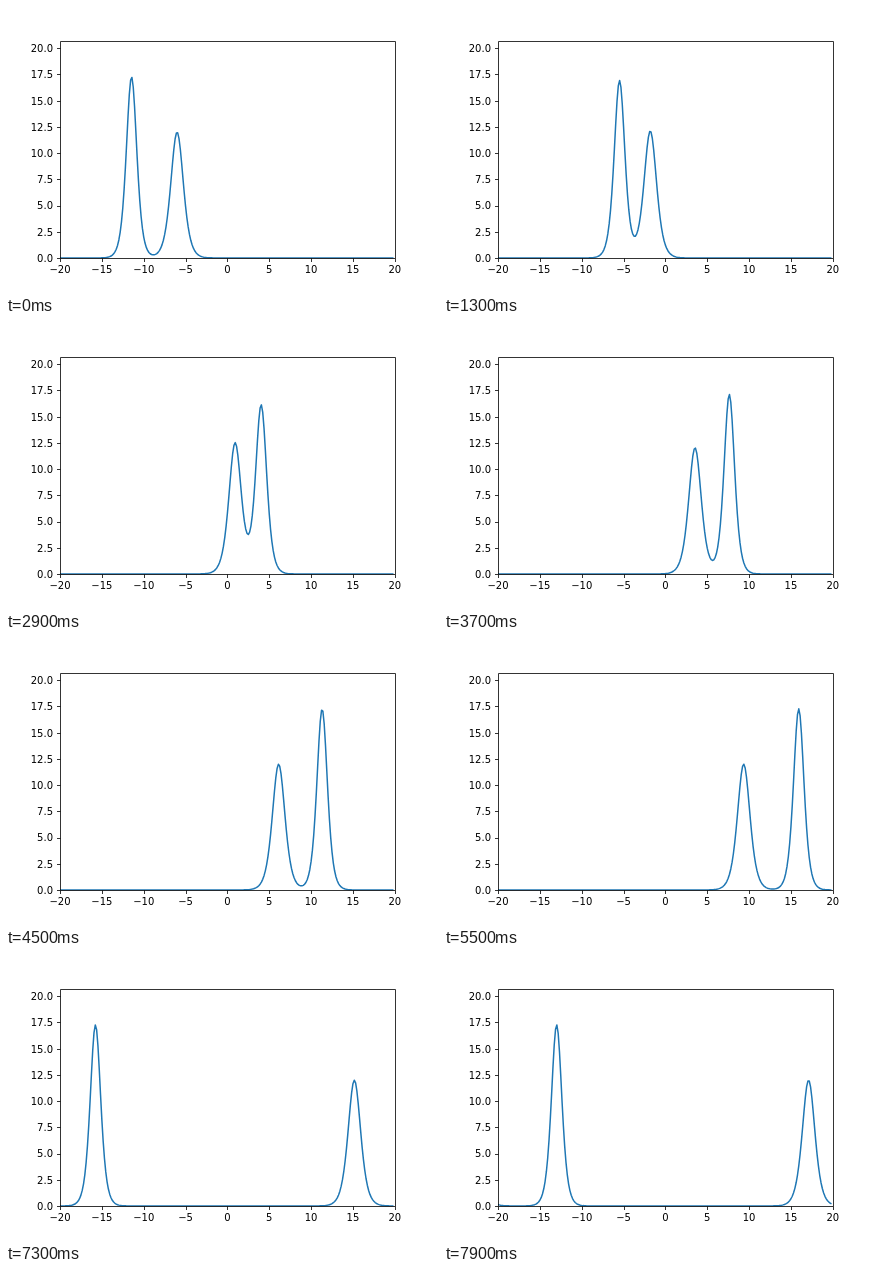
Write an HTML page that moves like this. It is 432 by 288 pixels and loops after 8000 ms.

```html
<!DOCTYPE html>
<html lang="en">
<head>
<meta charset="utf-8">
<title>Two solitons</title>
<style>
  html, body { margin: 0; width: 100%; height: 100%; overflow: hidden; background: #fff; }
  svg { display: block; width: 432px; height: 288px; }
  text { font: 10px "DejaVu Sans", Verdana, sans-serif; fill: #000; }
  .axis { fill: none; stroke: #000; stroke-width: 0.8; }
  #curve { fill: none; stroke: #1f77b4; stroke-width: 1.5; stroke-linejoin: round; }
</style>
</head>
<body>
<svg viewBox="0 0 432 288">
  <clipPath id="plot"><rect x="54" y="35" width="335" height="217.5"/></clipPath>
  <path id="curve" clip-path="url(#plot)"/>
  <path class="axis" d="M54.5 35.5H389.5V252.5H54.5Z"/>
  <g id="ticks"></g>
</svg>
<script>
const LOOP = 8000, STEP = 100;
const SPAN = 40, POINTS = 256;
const LEFT = 54, BOTTOM = 252, WIDTH = 334.8, HEIGHT = 217.44;

// Wave numbers, start positions and speeds; each height is 3k².
const tall = { k: 2.4, start: -11.45, speed: 4.615 };
const small = { k: 2, start: -8.41, speed: 3.23 };
const Y_MAX = 3 * tall.k ** 2 * 1.2;
const coupling = ((tall.k - small.k) / (tall.k + small.k)) ** 2;

const px = x => LEFT + (x + SPAN / 2) / SPAN * WIDTH;
const py = y => BOTTOM - y / Y_MAX * HEIGHT;
const snap = v => Math.floor(v + 0.5) + 0.5;

// Two-soliton solution of the KdV equation: u = 12 (ln F)''.
function height(x, t) {
  const phase = s => s.k * (x - s.start - s.speed * t);
  const a = phase(tall), b = phase(small);
  const both = a + b + Math.log(coupling);
  const top = Math.max(0, a, b, both);
  const terms = [[0, 0], [a, tall.k], [b, small.k], [both, tall.k + small.k]];
  let f = 0, f1 = 0, f2 = 0;
  for (const [p, k] of terms) {
    const e = Math.exp(p - top);
    f += e;
    f1 += k * e;
    f2 += k * k * e;
  }
  return 12 * (f2 / f - (f1 / f) ** 2);
}

function add(name, attrs, content = "") {
  const node = document.createElementNS("http://www.w3.org/2000/svg", name);
  for (const key in attrs) node.setAttribute(key, attrs[key]);
  node.textContent = content;
  document.getElementById("ticks").append(node);
}

for (let x = -20; x <= 20; x += 5) {
  add("path", { class: "axis", d: `M${snap(px(x))} 252.5v3.5` });
  add("text", { x: px(x), y: 267, "text-anchor": "middle" }, String(x).replace("-", "\u2212"));
}
for (let y = 0; y <= 20; y += 2.5) {
  add("path", { class: "axis", d: `M54.5 ${snap(py(y))}h-3.5` });
  add("text", { x: 47, y: Math.round(py(y) + 3.8), "text-anchor": "end" }, y.toFixed(1));
}

const curve = document.getElementById("curve");

function draw(ms) {
  const t = Math.floor(ms % LOOP / STEP) * STEP / 1000;
  const points = Array.from({ length: POINTS }, (_, i) => {
    const x = -SPAN / 2 + i * SPAN / POINTS;
    const y = height(x, t) + height(x + SPAN, t);
    return `${px(x).toFixed(2)} ${py(y).toFixed(2)}`;
  });
  curve.setAttribute("d", "M" + points.join("L"));
}

const begin = performance.now();
function tick() {
  draw(performance.now() - begin);
  requestAnimationFrame(tick);
}
tick();
</script>
</body>
</html>
```
